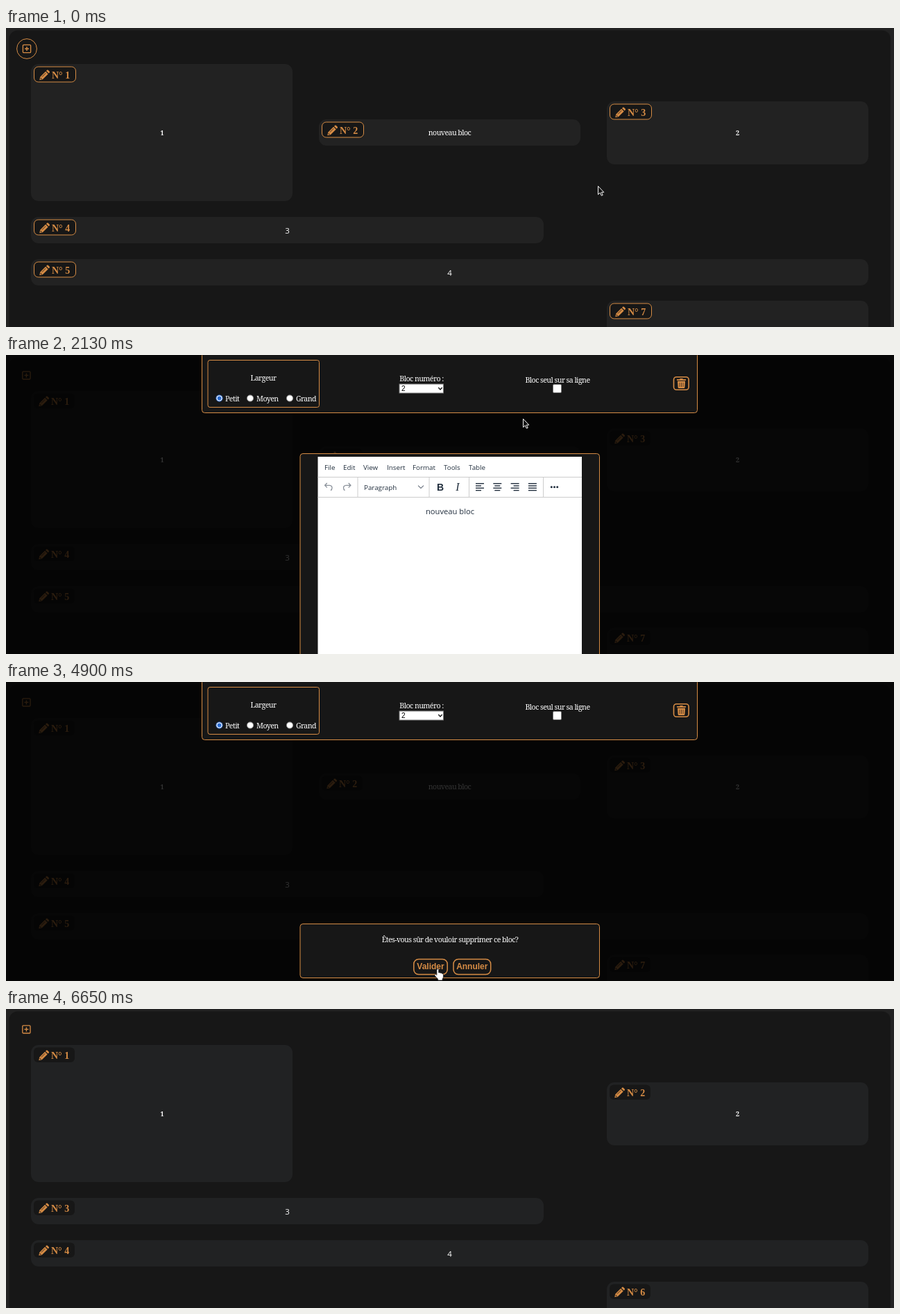
An HTML page for the animation above (6.68 s loop, 1280x432 px).

```html
<!DOCTYPE html>
<html lang="fr">
<head>
<meta charset="utf-8">
<title>Blocs</title>
<style>
  html, body { margin: 0; width: 100%; height: 100%; overflow: hidden; background: #222; }
  svg { display: block; width: 100vw; height: 100vh; }
  text { white-space: pre; }
  .serif { font: 10.6px "Noto Serif", serif; letter-spacing: -.55px; fill: #fff; }
  .digit { font: bold 9.2px "Noto Serif", serif; fill: #fff; }
  .sans { font: 11.5px "Open Sans", sans-serif; fill: #fff; }
  .tag { font: bold 14px "Liberation Serif", serif; fill: #d68c45; }
  .menu { font: 9.8px "Open Sans", sans-serif; fill: #222f3e; }
  .btn { font: bold 12px "Liberation Sans", sans-serif; fill: #d68c45; }
  .mid { text-anchor: middle; }
</style>
</head>
<body>
<svg viewBox="0 0 1280 432" xmlns="http://www.w3.org/2000/svg">
  <g id="page"></g>
  <rect id="shade" width="1280" height="432" fill="#000" opacity=".8"/>
  <g id="panel"></g>
  <g id="editor"></g>
  <g id="confirm"></g>
  <path id="arrow" d="M.5 .5V12.6L3.3 10L5.3 14.2L7.2 13.4L5.3 9.3H8.8Z" fill="#111" stroke="#fff" stroke-width=".95"/>
  <path id="hand" d="M3.5 1.6Q5 -.4 6.3 1.6V6Q7.8 5.2 8.7 6.4Q10.2 5.8 11 7.2Q12.9 6.9 13 8.8V12Q12.8 14 11.7 15V17H5.2V15.2L.9 10.5Q-.2 8.7 1.3 8.2Q2.4 8 3.5 9.5Z" fill="#fff" stroke="#111" stroke-width=".7"/>
</svg>
<script>
const LOOP = 6680;
const ORANGE = '#d68c45', DARK = '#171717', INK = '#222f3e';
const $ = id => document.getElementById(id);

const rect = (x, y, w, h, r, fill, stroke = 'none', sw = 1) =>
  `<rect x="${x}" y="${y}" width="${w}" height="${h}" rx="${r}" fill="${fill}" stroke="${stroke}" stroke-width="${sw}"/>`;
const text = (x, y, cls, s) => `<text x="${x}" y="${y}" class="${cls}">${s}</text>`;
const path = (d, stroke, sw = 1, fill = 'none') =>
  `<path d="${d}" fill="${fill}" stroke="${stroke}" stroke-width="${sw}"/>`;
const at = (x, y, s) => `<g transform="translate(${x} ${y})">${s}</g>`;

const pencil =
  path('M0 15L.9 10.5L8.8 2.6L12.4 6.2L4.5 14.1ZM9.7 1.7L10.8 .6Q11.6 -.2 12.4 .6L14.4 2.6Q15.2 3.4 14.4 4.2L13.3 5.3Z', 'none', 0, ORANGE) +
  path('M3.6 10.4L9 5M1.8 11.6V13.2H3.4', DARK, .8);

const plus = rect(.6, .6, 11.2, 11.2, 1.2, 'none', ORANGE, 1.3) +
  path('M6.2 3.2V9.2M3.2 6.2H9.2', ORANGE, 1.4);

// [x, y, width, height, label, label class, label x, label y]
const blocks = [
  [36, 52, 377, 198, '1', 'digit', 225, 155],
  [451, 132, 377, 38, 'nouveau bloc', 'serif', 639.5, 155],
  [866, 106, 377, 91, '2', 'digit', 1054.5, 155],
  [36, 273, 739, 38, '3', 'sans', 405.5, 297],
  [36, 334, 1207, 38, '4', 'sans', 639.5, 357.5],
  [866, 394, 377, 60, '', 'sans', 0, 0]
];

function tag(x, y, n, hover) {
  const d = hover ? 1 : 0;
  const box = hover ? rect(.5, .5, 60, 22, 6, DARK, ORANGE) : rect(0, 0, 59, 21.5, 6, DARK);
  return at(x + 4, y + 3.5, box + at(7.3 + d, 3.7 + d, pencil) + text(25 + d, 16 + d, 'tag', `N° ${n}`));
}

function drawPage(removed, hover) {
  const fill = removed ? '#212223' : '#222';
  let s = rect(0, 0, 1280, 432, 0, '#222') + rect(4.5, 3.5, 1270.5, 460, 12, DARK);
  if (hover) s += `<circle cx="30" cy="30" r="14.4" fill="none" stroke="${ORANGE}"/>`;
  s += at(hover ? 23.8 : 23.2, hover ? 23.8 : 23.2, plus);
  blocks.forEach(([x, y, w, h, label, cls, lx, ly], i) => {
    if (removed && i === 1) return;
    // the sixth block on the page is hidden further down
    const n = i + 1 + (i === 5 ? 1 : 0) - (removed && i > 1 ? 1 : 0);
    s += rect(x, y, w, h, 11, fill) + text(lx, ly, cls + ' mid', label) + tag(x, y, n, hover);
  });
  return s;
}

function radio(x, on) {
  const ring = `<circle cx="${x}" cy="62.5" r="4.6" fill="#fff" stroke="${on ? '#2a6bd0' : '#888'}"/>`;
  return ring + (on ? `<circle cx="${x}" cy="62.5" r="2.9" fill="#2a6bd0"/>` : '');
}

function drawPanel(hot) {
  const c = hot ? '#f00' : ORANGE;
  return rect(282.5, -3.5, 714, 87, 4, DARK, ORANGE) +
    rect(291, 7.5, 160.5, 68, 3, 'none', ORANGE) +
    text(371, 37, 'serif mid', 'Largeur') +
    radio(307.5, true) + radio(352, false) + radio(409, false) +
    text(316, 67, 'serif', 'Petit') + text(361, 67, 'serif', 'Moyen') + text(418, 67, 'serif', 'Grand') +
    text(599, 37.5, 'serif mid', 'Bloc numéro :') +
    rect(567, 42, 63.5, 13, 0, '#fff', '#777') +
    `<text x="570" y="52" font-size="10" font-family="Liberation Sans, sans-serif">2</text>` +
    path('M623.3 47L626 50L628.7 47', '#111', 1.3) +
    text(795, 39.5, 'serif mid', 'Bloc seul sur sa ligne') +
    rect(788.5, 42.5, 12, 12, 1.5, '#fff', '#777') +
    rect(962.5, 31.7, 21.6, 18.6, 4, DARK, ORANGE, 1.6) +
    at(967, 34, path('M0 1H4L4.8 0H8.2L9 1H13V2.8H0ZM1 3.8H12L11.4 12.8Q11.2 14 10.2 14H2.8Q1.8 14 1.6 12.8Z', 'none', 0, c) +
      path('M4 5.8V12M6.5 5.8V12M9 5.8V12', DARK, .7));
}

function alignIcon(x, mode) {
  const rows = [12, mode === 'full' ? 12 : 8, 12, mode === 'full' ? 12 : 8];
  const shift = { left: 0, mid: .5, right: 1, full: 0 }[mode];
  return rows.map((w, i) => path(`M${x + (12 - w) * shift} ${185.7 + i * 3.3}h${w}`, INK, 1.4)).join('');
}

function drawEditor() {
  const menus = { File: 459, Edit: 486, View: 515, Insert: 549, Format: 586, Tools: 631, Table: 667 };
  let s = rect(424, 142.5, 431.5, 310, 4, DARK, ORANGE) + rect(449.5, 147, 380.5, 300, 0, '#fff');
  for (const m in menus) s += text(menus[m], 166, 'menu', m);
  s += path('M449.5 176.5H830M449.5 205.5H830M507 177V205M610 177V205M667.5 177V205M774.5 177V205', '#ccc');
  const undo = 'M3.8 0L.6 3.3L3.8 6.6M.8 3.3H7.5Q11 3.6 11 7Q11 9.6 9 10.6';
  s += at(459, 185, path(undo, '#8b929b', 1.3));
  s += `<g transform="translate(497.5 185) scale(-1 1)">${path(undo, '#8b929b', 1.3)}</g>`;
  s += text(516, 194.8, 'menu', 'Paragraph') + path('M594 188.7L598 192.5L602 188.7', '#6b7480', 1.1);
  s += `<text x="626" y="195.8" class="mid" font-family="Liberation Sans, sans-serif" font-size="14" font-weight="bold" fill="${INK}">B</text>`;
  s += `<text x="651" y="196" class="mid" font-family="Liberation Serif, serif" font-size="16" font-style="italic" fill="${INK}">I</text>`;
  ['left', 'mid', 'right', 'full'].forEach((m, i) => s += alignIcon(677 + i * 25.3, m));
  for (let i = 0; i < 3; i++) s += `<circle cx="${786.3 + i * 4.2}" cy="190.7" r="1.5" fill="${INK}"/>`;
  return s + `<text x="640" y="230" class="mid" font-family="Open Sans, sans-serif" font-size="11.2" fill="${INK}">nouveau bloc</text>`;
}

function drawConfirm() {
  return rect(424, 349.5, 431.5, 78, 4, DARK, ORANGE) +
    text(640, 376, 'serif mid', 'Êtes-vous sûr de vouloir supprimer ce bloc?') +
    rect(587.8, 400.5, 48.4, 22, 7, DARK, ORANGE, 1.5) + text(612, 415.3, 'btn mid', 'Valider') +
    rect(645, 400.5, 53.7, 22, 7, DARK, ORANGE, 1.5) + text(671.8, 415.3, 'btn mid', 'Annuler');
}

const ease = {
  hold: () => 0,
  line: u => u,
  in: u => u * u,
  out: u => 1 - (1 - u) ** 2,
  both: u => u * u * (3 - 2 * u)
};

// pointer path: [time, x, y, easing towards this point]
const route = [
  [0, 853, 228], [60, 853, 228, 'hold'], [730, 496, 151, 'both'], [800, 496, 151, 'hold'], [830, 497, 150, 'line'],
  [1500, 497, 150, 'hold'], [1700, 481, 169, 'both'], [2130, 744, 92, 'in'], [2160, 774, 85, 'line'],
  [2180, 774, 85, 'hold'], [2640, 984, 41, 'out'], [2830, 984, 41, 'hold'], [2950, 981, 41, 'line'],
  [3560, 981, 41, 'hold'], [4230, 639, 358, 'both'], [4310, 639, 358, 'hold'], [4730, 622, 414, 'both'],
  [4980, 1190, 339, 'hold'], [5300, 1189, 362, 'out'], [6090, 1189, 362, 'hold'], [6650, 1189, 433, 'both'],
  [LOOP, 1189, 433, 'hold']
];

function pointer(t) {
  const i = route.findIndex(p => p[0] > t);
  const [t0, x0, y0] = route[i - 1], [t1, x1, y1, kind] = route[i];
  const u = ease[kind]((t - t0) / (t1 - t0));
  return [x0 + (x1 - x0) * u, y0 + (y1 - y0) * u];
}

const inside = (x, y, l, t, r, b) => x >= l && x <= r && y >= t && y <= b;
const show = (id, on) => $(id).style.display = on ? '' : 'none';
const place = (id, x, y) => $(id).setAttribute('transform', `translate(${x.toFixed(1)} ${y.toFixed(1)})`);

const drawn = {};
function fill(id, draw, ...args) {
  const key = args.join();
  if (drawn[id] === key) return;
  drawn[id] = key;
  $(id).innerHTML = draw(...args);
}

function render(t) {
  const modal = t >= 1160 && t < 4980;
  const asking = t >= 3160;
  const [x, y] = pointer(t);
  const onTrash = modal && inside(x, y, 962, 31, 985, 51);
  const onValid = modal && asking && inside(x, y, 587, 400, 637, 423);
  const onTag = t >= 830 && t < 1120;
  const hand = onTrash || onValid || onTag;

  fill('page', drawPage, t >= 4980, !modal && t < 6650);
  fill('panel', drawPanel, onTrash);
  show('shade', modal);
  show('panel', modal);
  show('editor', modal && !asking);
  show('confirm', modal && asking);
  show('hand', hand);
  show('arrow', !hand && t < 6650);
  place('hand', x - 4.6, y);
  place('arrow', x, y);
}

$('editor').innerHTML = drawEditor();
$('confirm').innerHTML = drawConfirm();

const start = performance.now();
function tick() {
  render((performance.now() - start) % LOOP);
  requestAnimationFrame(tick);
}
tick();
</script>
</body>
</html>
```
